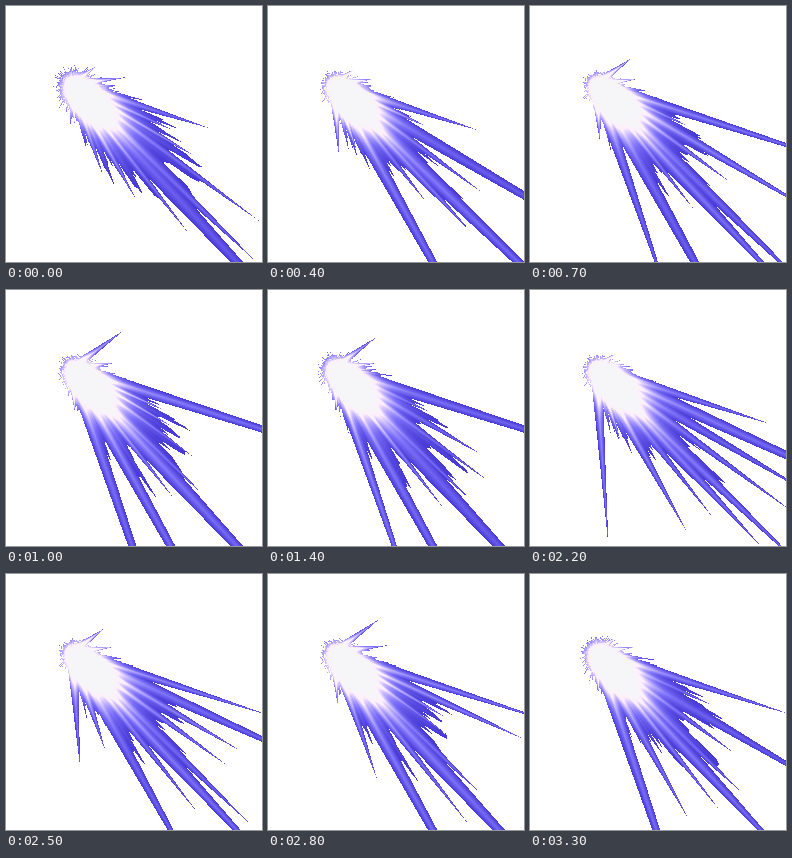
Animation of 256x256 px, one loop 3400 ms. Source, as an HTML page with a canvas:

```html
<!DOCTYPE html>
<html lang="en">
<head>
<meta charset="utf-8">
<style>
html, body { margin: 0; height: 100%; overflow: hidden; background: #fff; }
canvas { display: block; width: 100vw; height: 100vh; image-rendering: pixelated; }
</style>
</head>
<body>
<canvas id="stage" width="256" height="256"></canvas>
<script>
const SIZE = 256, STEP = 100, STEPS = 34;
const ORIGIN = { x: 66, y: 78 };
const AXIS = 44.5;
const ctx = document.getElementById('stage').getContext('2d');
const image = ctx.createImageData(SIZE, SIZE);

// Steps at which the ray lengths below are reached
const KEYS = [0, 4, 10, 18, 22, 28, 33, 34];
const HEAD = [16, 12, 12, 16, 12, 12, 14];

// Angle in degrees, half width at the root, length at each key
const RAYS = [
  [-36, 5, 30, 25, 64, 40, 25, 56, 25],
  [-7, 5, 54, 38, 44, 42, 28, 54, 38],
  [17.8, 7, 144, 151, 400, 400, 184, 230, 205],
  [24.6, 8, 110, 100, 100, 110, 420, 212, 126],
  [30.4, 8, 140, 420, 115, 225, 260, 130, 310],
  [36.2, 7, 232, 184, 149, 232, 246, 140, 172],
  [44, 10, 255, 440, 180, 200, 290, 200, 200],
  [47.2, 11, 420, 200, 420, 420, 240, 420, 310],
  [52, 7, 190, 150, 165, 190, 190, 218, 200],
  [61, 8, 131, 400, 420, 420, 188, 420, 194],
  [71.3, 7, 95, 70, 420, 162, 75, 133, 400],
  [86, 6, 40, 72, 45, 45, 178, 52, 40]
];

// Brightness, red, green, blue
const RAMP = [
  [0, 70, 56, 212],
  [0.35, 122, 110, 248],
  [0.65, 196, 182, 255],
  [0.88, 255, 238, 252],
  [1.1, 246, 246, 248]
];

const mix = (a, b, t) => a + (b - a) * t;

function hash(a, b) {
  const v = Math.sin(a * 127.1 + b * 311.7) * 43758.5453;
  return v - Math.floor(v);
}

function smoothNoise(x, seed) {
  const c = Math.floor(x);
  return mix(hash(c, seed), hash(c + 1, seed), x - c);
}

function spikes(x, seed) {
  const c = Math.floor(x);
  return hash(c, seed) * (1 - Math.abs(2 * (x - c) - 1));
}

function colour(b) {
  let i = 1;
  while (i < RAMP.length - 1 && b > RAMP[i][0]) i++;
  const lo = RAMP[i - 1], hi = RAMP[i];
  const t = Math.min(1, (b - lo[0]) / (hi[0] - lo[0]));
  return [1, 2, 3].map(n => mix(lo[n], hi[n], t));
}

function pose(step) {
  let i = 0;
  while (step >= KEYS[i + 1]) i++;
  const t = (step - KEYS[i]) / (KEYS[i + 1] - KEYS[i]);
  const next = (i + 1) % HEAD.length;
  return {
    head: mix(HEAD[i], HEAD[next], t),
    rays: RAYS.map(([angle, width, ...len]) => ({
      cos: Math.cos(angle * Math.PI / 180),
      sin: Math.sin(angle * Math.PI / 180),
      width,
      len: mix(len[i], len[next], t)
    }))
  };
}

// Ragged outline of the body as a radius for each angle
function outline(angle, head, seed) {
  let off = angle - AXIS;
  if (off < -180) off += 360;
  const side = Math.max(0, Math.cos(off * Math.PI / 180) + 0.5);
  const base = head + 7 * side + 115 * Math.exp(-((off / 29) ** 2));
  return base * (0.74 + 0.5 * spikes(angle / 5, seed) + 0.24 * spikes(angle / 1.7, seed + 20));
}

function glow(x, y) {
  const along = (x + y) * Math.SQRT1_2 - 18;
  const across = (y - x) * Math.SQRT1_2;
  const e = (along / (along < 0 ? 34 : 60)) ** 2 + (across / 26) ** 2;
  return 1.4 * Math.exp(-1.6 * e);
}

function draw(step) {
  const { head, rays } = pose(step);
  const seed = step % 9 + 1;
  image.data.fill(255);
  for (let py = 0; py < SIZE; py++) {
    for (let px = 0; px < SIZE; px++) {
      const x = px + 0.5 - ORIGIN.x, y = py + 0.5 - ORIGIN.y;
      const r = Math.hypot(x, y);
      const angle = Math.atan2(y, x) * 180 / Math.PI;
      let depth = 1 - r / outline(angle, head, seed);
      for (const { cos, sin, width, len } of rays) {
        const d = x * cos + y * sin;
        if (d <= 0 || d >= len) continue;
        const half = width * (1 - d / len);
        depth = Math.max(depth, 1 - Math.abs(y * cos - x * sin) / half);
      }
      if (depth <= 0) continue;
      const streak = 0.7 + 0.6 * smoothNoise(angle / 2.5, seed + 40);
      const shine = depth * streak * (0.22 + 0.42 * Math.exp(-r / 120));
      const rgb = colour(glow(x, y) + shine);
      image.data.set(rgb, (py * SIZE + px) * 4);
    }
  }
  ctx.putImageData(image, 0, 0);
}

let shown = -1;
const start = performance.now();

function tick() {
  const step = Math.floor((performance.now() - start) / STEP) % STEPS;
  if (step !== shown) draw(shown = step);
  requestAnimationFrame(tick);
}
tick();
</script>
</body>
</html>
```
